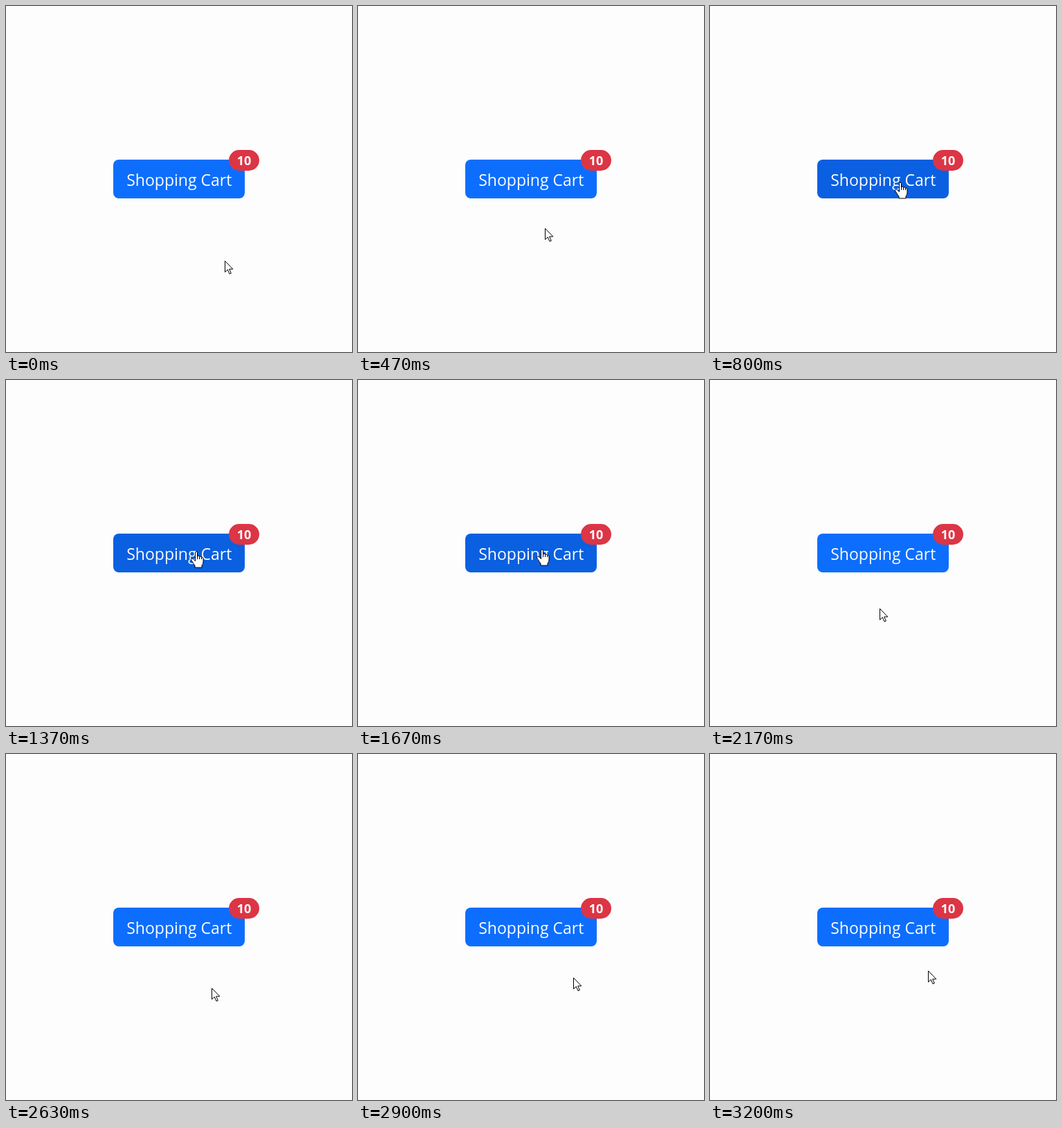
Recreate the animation shown at these times as an HTML page. Size 500 by 500 pixels, loop 3230 ms.

```html
<!DOCTYPE html>
<html lang="en">
<head>
<meta charset="utf-8">
<title>Shopping Cart</title>
<style>
  html, body { margin: 0; width: 100%; height: 100%; overflow: hidden; background: #fdfdfd; }
  svg { display: block; width: 100vw; height: 100vh; }
  text { font-family: "Open Sans", "Noto Sans", sans-serif; text-anchor: middle; fill: #fdfdfd; }
  .cursor path { fill: #fff; stroke: #000; stroke-width: 1; stroke-linejoin: round; }
</style>
</head>
<body>
<svg viewBox="0 0 500 500">
  <rect width="500" height="500" fill="#fdfdfd"/>
  <rect id="button" x="155" y="222" width="190" height="56" rx="8"/>
  <text x="250.3" y="260" font-size="23">Shopping Cart</text>
  <rect x="322" y="208" width="44" height="30" rx="15" fill="#dc3545"/>
  <text x="344" y="230" font-size="18" font-weight="700">10</text>
  <g id="arrow" class="cursor">
    <path d="M.5 .5V16.5L4.3 13L7 19.2L9.3 18.2L6.7 12.2H11.8Z"/>
  </g>
  <g id="hand" class="cursor">
    <path d="M-1.5 1.5Q-1.5 0 0 0Q1.5 0 1.5 1.5V7Q1.5 6 3 6Q4.5 6 4.5 7.5Q5 6.8 6.2 7Q7.5 7.2 7.5 8.5Q8 8 9 8.3Q10 8.7 10 10V15Q10 18 8 20V23H-2V20Q-4 18 -5.5 15L-7.5 12Q-8 10.5 -6.7 10Q-5 9.7 -3.5 11.5L-1.5 13.5Z"/>
    <path d="M1.5 7V11M4.5 7.5V11M7.5 8.5V11"/>
  </g>
</svg>
<script>
const LOOP = 3230;
const BUTTON_BOTTOM = 278;
const BASE = [13, 110, 253];
const HOVER = [10, 96, 224];

// Pointer path: tick (1/30 s), x, y
const PATH = [
  [0, 316, 368], [7, 270, 322], [13, 270, 322], [24, 275, 255],
  [28, 275, 249], [40, 275, 249], [41, 275, 248], [47, 278, 240],
  [56, 232, 274], [58, 232, 294], [65, 245, 330], [72, 256, 341],
  [79, 297, 338], [88, 312, 321], [95, 315, 313]
];

const button = document.getElementById("button");
const arrow = document.getElementById("arrow");
const hand = document.getElementById("hand");

const clamp = v => Math.max(0, Math.min(1, v));

function slope(i, axis) {
  const a = PATH[i], b = PATH[i + 1];
  return (b[axis] - a[axis]) / (b[0] - a[0]);
}

// Monotone tangent: zero at holds and turning points
function tangent(i, axis) {
  if (i === 0) return slope(0, axis);
  if (i === PATH.length - 1) return 0;
  const a = slope(i - 1, axis), b = slope(i, axis);
  return a * b > 0 ? 2 * a * b / (a + b) : 0;
}

function pointer(tick, axis) {
  let i = 0;
  while (i < PATH.length - 2 && PATH[i + 1][0] <= tick) i++;
  const a = PATH[i], b = PATH[i + 1];
  const span = b[0] - a[0];
  const u = clamp((tick - a[0]) / span);
  const v = 1 - u;
  return a[axis] * (1 + 2 * u) * v * v + b[axis] * u * u * (3 - 2 * u)
    + span * u * v * (v * tangent(i, axis) - u * tangent(i + 1, axis));
}

function draw(ms) {
  const tick = Math.floor((ms % LOOP + 4) * 0.03);
  const x = Math.round(pointer(tick, 1));
  const y = Math.round(pointer(tick, 2));
  const over = y < BUTTON_BOTTOM;
  const glow = clamp((tick - 20) / 4) - clamp((tick - 58) / 4);
  const color = BASE.map((c, i) => Math.round(c + (HOVER[i] - c) * glow));

  button.setAttribute("fill", `rgb(${color})`);
  arrow.setAttribute("transform", `translate(${x} ${y})`);
  hand.setAttribute("transform", `translate(${x} ${y})`);
  arrow.setAttribute("visibility", over ? "hidden" : "visible");
  hand.setAttribute("visibility", over ? "visible" : "hidden");
}

const start = performance.now();
function loop() {
  draw(performance.now() - start);
  requestAnimationFrame(loop);
}
loop();
</script>
</body>
</html>
```
